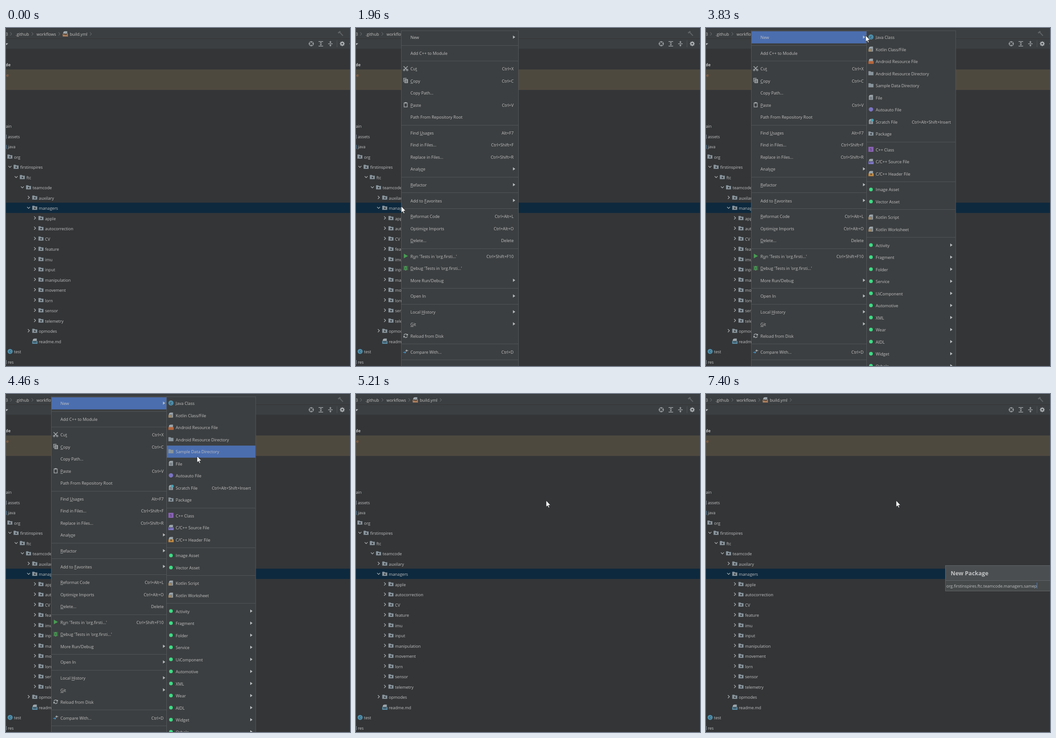
These frames come from a looping animation (755 by 742 pixels, 7990 ms). An HTML page with a canvas:

```html
<!DOCTYPE html>
<html lang="en">
<head>
<meta charset="utf-8">
<title>New package</title>
<style>
html, body { margin: 0; width: 100%; height: 100%; overflow: hidden; background: #333537; }
canvas { display: block; }
</style>
</head>
<body>
<canvas id="stage" width="755" height="742"></canvas>
<script>
const W = 755, H = 742, LOOP = 7990;
const ctx = document.getElementById('stage').getContext('2d');
const SANS = '"Open Sans", "Noto Sans", sans-serif';
const FONT = '9.05px ' + SANS, MENU_FONT = '9.15px ' + SANS;
const INK = '#c1c1c1', PANEL = '#3c3f41', TREE = '#333537', BLUE = '#4b6eaf', ICON = '#adb1b4';
const FOLDER = '#88949c', LINE = '#525557';

// ---------- helpers ----------
function rect(x, y, w, h, color) {
  ctx.fillStyle = color;
  ctx.fillRect(x, y, w, h);
}

function disc(x, y, r, color) {
  ctx.fillStyle = color;
  ctx.beginPath();
  ctx.arc(x, y, r, 0, 7);
  ctx.fill();
}

function poly(points, color) {
  ctx.fillStyle = color;
  ctx.beginPath();
  points.forEach(([x, y]) => ctx.lineTo(x, y));
  ctx.closePath();
  ctx.fill();
}

function stroke(points, color, width = 1) {
  ctx.strokeStyle = color;
  ctx.lineWidth = width;
  ctx.beginPath();
  points.forEach(([x, y]) => ctx.lineTo(x, y));
  ctx.stroke();
}

function ring(x, y, r, color, width = 1, from = 0, to = 7) {
  ctx.strokeStyle = color;
  ctx.lineWidth = width;
  ctx.beginPath();
  ctx.arc(x, y, r, from, to);
  ctx.stroke();
}

function text(s, x, y, color = INK, font = FONT, align = 'left') {
  ctx.font = font;
  ctx.fillStyle = color;
  ctx.textAlign = align;
  ctx.fillText(s, x, Math.round(y + 3.6));
}

// An underscore marks the letter that gets underlined.
function label(s, x, y) {
  const at = s.indexOf('_');
  const plain = s.replace('_', '');
  text(plain, x, y, INK, MENU_FONT);
  if (at < 0) return;
  const left = x + ctx.measureText(plain.slice(0, at)).width;
  rect(left, Math.round(y + 3.6) + 1, ctx.measureText(plain[at]).width, 1, '#a2a4a5');
}

// ---------- icons, centred on x, y ----------
function folder(x, y) {
  poly([[x - 5.5, y - 4.5], [x - 1, y - 4.5], [x + .5, y - 3], [x + 5.5, y - 3],
    [x + 5.5, y + 4.5], [x - 5.5, y + 4.5]], FOLDER);
}

function pack(x, y) {
  folder(x, y);
  disc(x + .3, y + .8, 1.7, TREE);
}

function doc(x, y) {
  poly([[x - 1, y - 5.5], [x + 4.5, y - 5.5], [x + 4.5, y + 5.5], [x - 4.5, y + 5.5], [x - 4.5, y - 2]], '#9aa4aa');
  poly([[x - 4.5, y - 2.8], [x - 1.8, y - 5.5], [x - 1.8, y - 2.8]], '#bcc3c7');
}

function plainDoc(x, y) {
  doc(x, y);
  for (let i = 0; i < 3; i++) rect(x - 2.5, y - 1 + i * 2, 5, 1, '#596065');
}

const badge = (color, tag) => (x, y) => {
  doc(x, y);
  rect(x - 5.5, y, 11.5, 6, color);
  if (tag) text(tag, x + .3, y - .2, '#24282b', 'bold 5px ' + SANS, 'center');
};

function ktFile(x, y) {
  plainDoc(x, y);
  rect(x - 5.5, y, 5.5, 5.5, '#a08a68');
}

function classIcon(x, y) {
  disc(x, y, 5.6, '#4d8eab');
  text('C', x, y - .7, '#243b47', '8px ' + SANS, 'center');
}

function scratch(x, y) {
  plainDoc(x, y);
  disc(x + 3, y - 3, 3, '#43a5b8');
}

function structIcon(x, y) {
  rect(x - 5.5, y - 5.5, 11, 11, '#8a63b5');
  text('S', x, y - .8, '#33244a', '8px ' + SANS, 'center');
}

function cut(x, y) {
  stroke([[x - 4.5, y - 5], [x + 3, y + 2.5]], ICON, 1.4);
  stroke([[x + 4.5, y - 5], [x - 3, y + 2.5]], ICON, 1.4);
  ring(x - 3.4, y + 3.4, 1.7, ICON, 1.2);
  ring(x + 3.4, y + 3.4, 1.7, ICON, 1.2);
}

function copy(x, y) {
  stroke([[x - 4.5, y + 3], [x - 4.5, y - 5], [x + 2, y - 5]], ICON, 1.2);
  rect(x - 2.5, y - 3, 7.5, 8.5, ICON);
  for (let i = 0; i < 3; i++) rect(x - 1, y - 1 + i * 2, 4.5, 1, PANEL);
}

function paste(x, y) {
  ctx.strokeStyle = ICON;
  ctx.lineWidth = 1.3;
  ctx.strokeRect(x - 3.5, y - 4, 7, 9);
  rect(x - 2, y - 5.5, 4, 2.6, ICON);
}

function run(x, y) {
  poly([[x - 4, y - 5], [x + 5, y], [x - 4, y + 5]], '#499c54');
}

function bug(x, y) {
  for (const d of [-3, 0, 3]) stroke([[x - 5.3, y + d * 1.2], [x + 5.3, y + d * 1.2]], '#499c54');
  ctx.fillStyle = '#499c54';
  ctx.beginPath();
  ctx.ellipse(x, y + .5, 3.4, 5, 0, 0, 7);
  ctx.fill();
  rect(x - 1.8, y - 1.2, 3.6, 1, PANEL);
  rect(x - 1.8, y + 1.4, 3.6, 1, PANEL);
}

function reload(x, y) {
  ring(x, y, 4, ICON, 1.4, 3.4, 5.9);
  ring(x, y, 4, ICON, 1.4, .3, 2.8);
  poly([[x + 5, y - 4.5], [x + 5, y - .5], [x + 1, y - .5]], ICON);
  poly([[x - 5, y + 4.5], [x - 5, y + .5], [x - 1, y + .5]], ICON);
}

function compare(x, y) {
  stroke([[x - 5.5, y + 2], [x - 1, y + 2]], '#3f92c4', 1.4);
  poly([[x - 2, y - 1], [x + 1, y + 2], [x - 2, y + 5]], '#3f92c4');
  stroke([[x + 1, y - 2], [x + 5.5, y - 2]], ICON, 1.4);
  poly([[x + 2.5, y - 5], [x - .5, y - 2], [x + 2.5, y + 1]], ICON);
}

const greenDot = (x, y) => disc(x, y + .5, 4, '#3ddc84');
const purpleDot = (x, y) => disc(x, y, 4.8, '#7a74c4');

function chevron(x, y, open) {
  const p = open ? [[-3.2, -1.6], [0, 1.6], [3.2, -1.6]] : [[-1.6, -3.4], [1.8, 0], [-1.6, 3.4]];
  stroke(p.map(([a, b]) => [x + a, y + b]), '#b4b7b9', 1.3);
}

// ---------- background window ----------
const rowY = i => 283 + i * 22.5;
// name, indent, open state (1 open, 0 closed, -1 no arrow)
const tree = [['org', 0, -1], ['firstinspires', 1, 1], ['ftc', 2, 1], ['teamcode', 3, 1],
  ['auxilary', 4, 0], ['managers', 4, 1],
  ...['apple', 'autocorrection', 'CV', 'feature', 'imu', 'input', 'manipulation',
    'movement', 'lorn', 'sensor', 'telemetry'].map(n => [n, 5, 0]),
  ['opmodes', 4, 0], ['readme.md', 4, -1]];

function toolbar() {
  rect(0, 0, W, 45, PANEL);
  rect(0, 0, W, 1, '#333638');
  rect(0, 23, W, 1, '#323436');
  rect(0, 45, W, 1, '#36393b');
  text('3', -1, 13);
  text('.github', 21, 13);
  text('workflows', 67, 13);
  text('build.yml', 140, 13);
  for (const x of [11, 58, 117, 186]) {
    stroke([[x - 1.7, 9.5], [x + 1.5, 13], [x - 1.7, 16.5]], '#777b7d');
  }
  badge('#c08a63', 'YML')(130, 12.5);
  stroke([[729, 11], [734, 7.5]], '#606365', 3);
  stroke([[732, 9], [739.5, 17]], '#606365', 2);
  poly([[-3, 33.5], [5, 33.5], [1, 37.5]], ICON);
  ring(670, 34.5, 4.7, ICON, 1.3);
  for (const [a, b] of [[1, 0], [-1, 0], [0, 1], [0, -1]]) {
    stroke([[670 + a * 1.8, 34.5 + b * 1.8], [670 + a * 5.5, 34.5 + b * 5.5]], ICON, 1.3);
  }
  for (const [x, d] of [[691, 1], [712, -1]]) {
    if (d > 0) {
      rect(x - 5, 29, 10, 1.3, ICON);
      rect(x - 5, 39, 10, 1.3, ICON);
    } else rect(x - 5, 34, 10, 1.3, ICON);
    for (const s of [-1, 1]) {
      const tip = 34.6 + s * (d > 0 ? 3.6 : 1.6), base = tip - s * d * 2.6;
      poly([[x - 2.6, base], [x + 2.6, base], [x, tip]], ICON);
      if (d < 0) rect(x - .6, s < 0 ? 28.5 : 38, 1.2, 2.5, ICON);
    }
  }
  rect(726, 27, 1, 15, '#515456');
  for (let i = 0; i < 8; i++) {
    const a = i * Math.PI / 4, c = Math.cos(a), s = Math.sin(a);
    stroke([[738 + c * 3, 34.5 + s * 3], [738 + c * 5.3, 34.5 + s * 5.3]], ICON, 2);
  }
  ring(738, 34.5, 2.9, ICON, 2.2);
  rect(754, 34, 1, 1.3, ICON);
}

function backdrop() {
  rect(0, 0, W, H, TREE);
  toolbar();
  rect(0, 91, W, 45, '#4e493f');
  rect(0, 383.4, W, 22.5, '#0d293e');
  text('de', -1, 80.5, INK, 'bold ' + FONT);
  text('le', -1.5, 103, '#b5713f');
  text('ain', -.5, rowY(-3));
  [['assets', -2, '#88949c'], ['java', -1, '#5f8fb5'], ['res', 20, '#88949c']].forEach(([s, i, c]) => {
    text(s, 4, rowY(i));
    rect(0, rowY(i) - 4, 1, 9, c);
  });
  tree.forEach(([name, depth, open], i) => {
    const x = 17.5 + depth * 13.65, y = rowY(i);
    text(name, x, y);
    (name === 'readme.md' ? badge('#5f93ad', 'MD') : pack)(x - 9, y - .8);
    if (open >= 0) chevron(x - 22.5, y - 1, open);
  });
  classIcon(9, rowY(19) - .5);
  text('test', 17.5, rowY(19));
}

// ---------- menus ----------
// label, shortcut ('>' opens a submenu), icon; null is a separator
const mainItems = [['New', '>'], null, ['Add C++ to Module'], null,
  ['Cu_t', 'Ctrl+X', cut], ['_Copy', 'Ctrl+C', copy], ['Copy Path...'], ['_Paste', 'Ctrl+V', paste],
  ['Path From Repository Root'], null,
  ['Find _Usages', 'Alt+F7'], ['Find in Files...', 'Ctrl+Shift+F'], ['Replace in Files...', 'Ctrl+Shift+R'],
  ['Analy_ze', '>'], null, ['_Refactor', '>'], null, ['Add to _Favorites', '>'], null,
  ['_Reformat Code', 'Ctrl+Alt+L'], ['Optimi_ze Imports', 'Ctrl+Alt+O'], ['_Delete...', 'Delete'], null,
  ["R_un 'Tests in 'org.firsti...'", 'Ctrl+Shift+F10', run], ["_Debug 'Tests in 'org.firsti...'", '', bug],
  ['More Run/Debug', '>'], null, ['Open In', '>'], null,
  ['Local _History', '>'], ['_Git', '>'], ['Reload from Disk', '', reload], null,
  ['Compare With...', 'Ctrl+D', compare], null];

const newItems = [['Java Class', '', classIcon], ['Kotlin Class/File', '', ktFile],
  ['Android Resource File', '', badge('#b5653a')], ['Android Resource Directory', '', folder],
  ['Sample Data Directory', '', folder], ['File', '', plainDoc], ['Autoauto File', '', purpleDot],
  ['Scratch File', 'Ctrl+Alt+Shift+Insert', scratch], ['Package', '', pack], null,
  ['C++ Class', '', structIcon], ['C/C++ Source File', '', badge('#7f77c9', 'C++')],
  ['C/C++ Header File', '', badge('#c08a45', 'H')], null,
  ['Image Asset', '', greenDot], ['Vector Asset', '', greenDot], null,
  ['Kotlin Script', '', ktFile], ['Kotlin Worksheet', '', ktFile], null,
  ...['Activity', 'Fragment', 'Folder', 'Service', 'UiComponent', 'Automotive', 'XML', 'Wear',
    'AIDL', 'Widget', 'Orbelo'].map(n => [n, '>', greenDot])];

// hoverY: pointer height, or null when no row is lit
function menu(items, x, w, hoverY) {
  rect(x, 5.5, w, H, '#55585a');
  rect(x + 1, 6.5, w - 2, H, PANEL);
  let y = 20.5;
  for (const item of items) {
    if (!item) {
      rect(x + 1, Math.round(y - 9.5), w - 2, 1, LINE);
      y += 8.1;
      continue;
    }
    const [name, key, icon] = item;
    if (hoverY !== null && Math.abs(hoverY - y) < 13.25) rect(x + 1, y - 13.25, w - 2, 26.5, BLUE);
    if (icon) icon(x + 10, y - .8);
    label(name, x + 20.5, y);
    const right = x + w - 11;
    if (key === '>') poly([[right - 1.5, y - 4], [right + 3.5, y - .5], [right - 1.5, y + 3]], '#b8bbbd');
    else if (key) text(key, right, y, INK, MENU_FONT, 'right');
    y += 26.5;
  }
}

// ---------- pointer ----------
// Each run: start time, step length, [step, x, y] stops
const runs = [
  [260, 70, [[0, 597, 715], [4, 300, 570], [8, 49, 455], [11, 115, 402], [14, 99, 391]]],
  [2570, 68.2, [[0, 106, 380], [2, 170, 240], [5, 301, -2], [7, 318, -1], [11, 308, 8]]],
  [3830, 69.3, [[0, 350, 16], [4, 402, 42], [9, 419, 136], [11, 418, 209], [14, 417, 233.5]]]
];

function pointerAt(t) {
  const r = runs.filter(r => t >= r[0]).pop();
  if (!r) return null;
  const [start, dt, stops] = r;
  const n = Math.min(Math.floor((t - start + 5) / dt), 14);
  for (let i = 1; i < stops.length; i++) {
    const [a, x0, y0] = stops[i - 1], [b, x1, y1] = stops[i];
    if (n <= b) {
      const k = (n - a) / (b - a);
      return [x0 + (x1 - x0) * k, y0 + (y1 - y0) * k];
    }
  }
  return stops[stops.length - 1].slice(1);
}

function pointer([x, y]) {
  const shape = [[0, 0], [0, 14], [3.2, 11.2], [5.4, 16], [7.4, 15.1], [5.3, 10.4], [9.6, 10.1]];
  const p = shape.map(([a, b]) => [x + a + .3, y + b + .3]);
  poly(p, '#ffffff');
  stroke([...p, p[0]], '#1b1d1f', .7);
}

// ---------- dialog ----------
const keyTimes = [6860, 6960, 7060, 7270, 7400];

function dialog(t) {
  rect(525, 376, 240, 57, '#626567');
  rect(526, 377, 240, 32, '#4b4e51');
  rect(526, 410, 240, 22, '#45494a');
  text('New Package', 537, 394.5, t < 5880 ? '#8f9193' : '#c0c2c3', 'bold 12.5px ' + SANS);
  const typed = 'samep'.slice(0, keyTimes.filter(k => t >= k).length);
  const line = 'org.firstinspires.ftc.teamcode.managers.' + typed;
  text(line, 527.5, 421);
  const caret = (t >= 5880 && t < 6330) || t >= 6860;
  if (caret) rect(Math.round(527.5 + ctx.measureText(line).width), 414, 1, 13, '#4f83d6');
}

function draw(t) {
  backdrop();
  const at = pointerAt(t);
  const subOpen = t >= 3250;
  if (t >= 1960 && t < 5140) {
    const hover = subOpen ? 20.5 : at[0] > 100 ? Math.max(at[1], 20) : null;
    menu(mainItems, 99, 258, hover);
    if (subOpen) menu(newItems, 352, 196.5, at[0] > 352 ? at[1] : null);
  }
  if (t >= 5680) dialog(t);
  if ((t >= 1640 && t < 1700) || (t >= 5000 && t < 5070)) disc(at[0], at[1], 9.7, 'rgba(255,255,0,.45)');
  if (at) pointer(at);
}

const begin = performance.now();
function frame() {
  draw((performance.now() - begin) % LOOP);
  requestAnimationFrame(frame);
}
frame();
</script>
</body>
</html>
```
